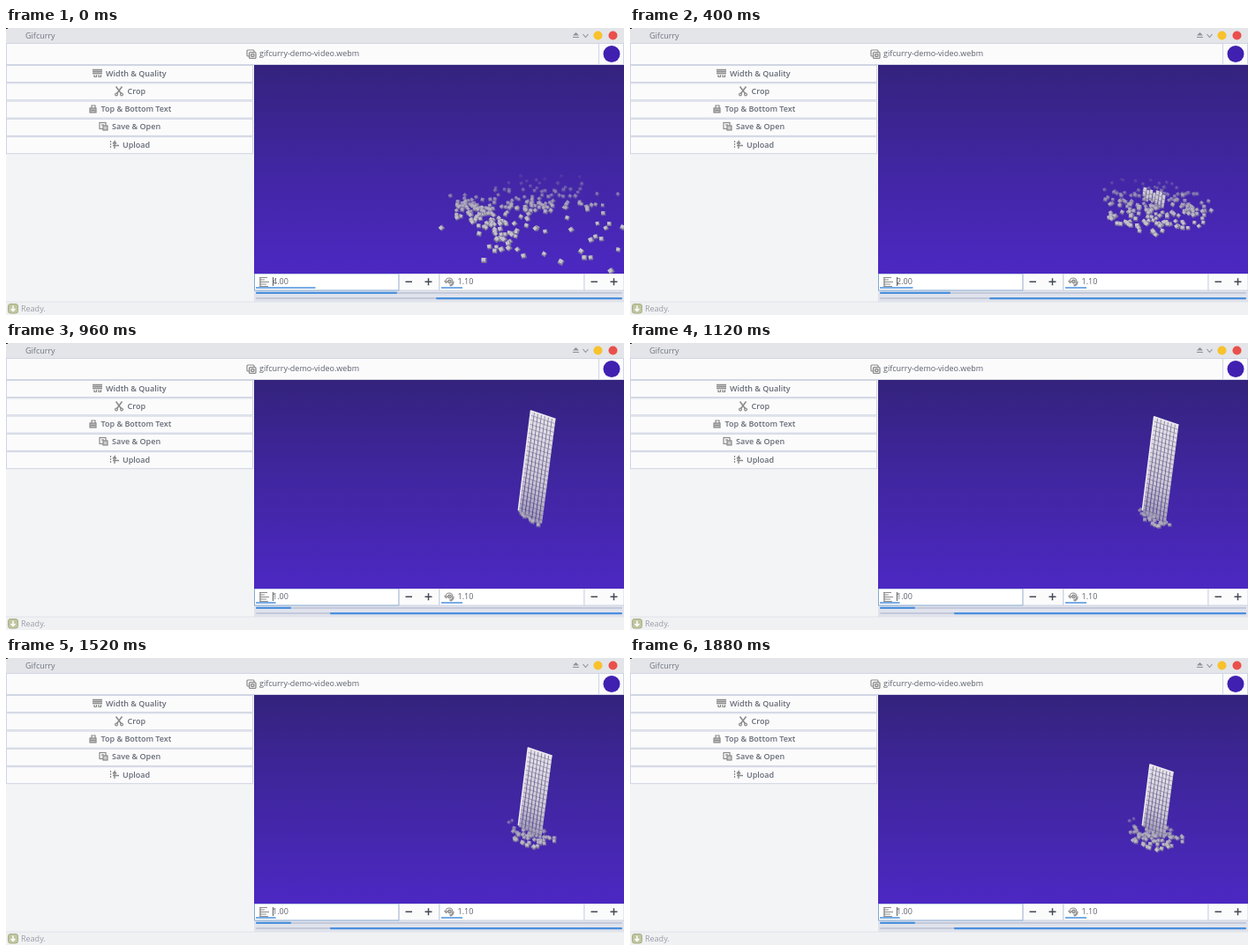
Recreate the animation shown at these times as an HTML page with a canvas. Size 700 by 326 pixels, loop 1.92 s.

```html
<!DOCTYPE html>
<html lang="en">
<head>
<meta charset="utf-8">
<title>Gifcurry</title>
<style>
html, body { margin: 0; width: 100%; height: 100%; overflow: hidden; background: #f3f4f6; }
#stage { position: relative; width: 700px; height: 326px; overflow: hidden; }
svg, canvas { position: absolute; left: 0; top: 0; }
canvas { left: 280.5px; top: 42px; }
text { font: 9px "Open Sans", "Noto Sans", sans-serif; fill: #5c616c; }
#menu text { font-weight: 600; fill: #656a75; }
.box { fill: #fbfbfc; stroke: #d0d5e3; }
.blue { fill: #4a90dd; }
.trough { fill: #c3c9da; }
.ico { fill: none; stroke: #8a8a8a; stroke-width: 1.2; }
.sign { stroke: #444a55; stroke-width: 1.5; }
</style>
</head>
<body>
<div id="stage">
<svg width="700" height="326" viewBox="0 0 700 326">
  <rect width="700" height="326" fill="#f3f4f6"/>
  <rect width="700" height="17" fill="#e3e5e9"/>
  <rect width="2" height="1" fill="#222"/>
  <text x="22" y="11.800" fill-opacity=".85">Gifcurry</text>
  <path d="M642 8.500L645.500 5L649 8.500ZM642 10h7v1h-7z" fill="#8b9099"/>
  <path d="M653.500 7l3 3.500l3-3.500" fill="none" stroke="#8b9099" stroke-width="1.100"/>
  <circle cx="670.500" cy="8.500" r="5" fill="#f8c22d"/>
  <circle cx="687.500" cy="8.500" r="5" fill="#ea504b"/>

  <rect class="box" x=".5" y="17.500" width="671" height="24"/>
  <rect class="box" x="671.500" y="17.500" width="28" height="24"/>
  <circle cx="686" cy="29.500" r="9.500" fill="#4020b0"/>
  <g class="ico">
    <rect x="273" y="25" width="8" height="7" rx="1"/>
    <rect x="275.500" y="27.500" width="7.500" height="7" rx="1" fill="#e4e4e4"/>
    <circle cx="279.300" cy="31" r="1.700"/>
  </g>
  <text x="287" y="32">gifcurry-demo-video.webm</text>

  <g id="menu"></g>
  <g class="ico">
    <path d="M98 47.500h11M98 49.500h11M98 51.500h11" stroke-width="1.500"/>
    <path d="M100 53v2.500h2.500V53M105 53v2.500h2.500V53"/>
    <path d="M124.500 66.500l6 8M131.500 66.500l-6 8" stroke-width="1.500"/>
    <circle cx="125" cy="75.500" r="1.400"/><circle cx="131" cy="75.500" r="1.400"/>
    <rect x="95" y="91" width="7" height="5" fill="#bbb"/><path d="M97 91v-3h4v3M96 93.500h5"/>
    <rect x="106" y="107.500" width="7" height="7"/><rect x="110" y="111" width="5" height="5" fill="#ccc"/><path d="M108 110h3"/>
    <path d="M118.500 128v9" stroke-dasharray="2 1"/><path d="M123 137v-8l-2 2.500M123 129l2 2.500M121 133.500h7" stroke-width="1.400"/>
  </g>

  <rect x="281" y="278" width="419" height="33" fill="#e0e3ec"/>
  <rect x="281.500" y="279" width="163.500" height="19" fill="#fff" stroke="#86a8cf"/>
  <rect class="box" x="445.500" y="279" width="45" height="19"/>
  <rect x="491" y="279" width="164" height="19" fill="#fff" stroke="#d0d5e3"/>
  <rect class="box" x="655" y="279" width="45" height="19"/>
  <path class="sign" d="M452.500 288.300h7.500M474.500 288.300h8M478.500 284.300v8M662.500 288.300h7.500M684.500 288.300h8M688.500 284.300v8"/>
  <path class="ico" d="M287 283.500h9M287 286h6M287 288.500h11M287 291h8M287 293.500h10M288 283v11"/>
  <g class="ico"><path d="M498 288a4 4 0 1 1 4 4M496.500 287l2 2.500l2-2.500"/><circle cx="502.500" cy="288" r="1.800" fill="#bbb"/><path d="M503 293a5 5 0 0 0 4-5"/></g>
  <path d="M302.500 283v10" stroke="#333" stroke-width=".8"/>
  <text id="value" x="302" y="291.200">4.00</text>
  <text x="511.500" y="291.200">1.10</text>
  <rect class="blue" id="under" x="283" y="294.300" height="1.500"/>
  <rect class="blue" x="493" y="294.300" width="24" height="1.500"/>
  <rect class="trough" x="283" y="300" width="415" height="2" rx="1"/>
  <rect class="trough" x="283" y="306" width="415" height="2" rx="1"/>
  <rect class="blue" id="start" x="283" y="299.800" height="2.200" rx="1"/>
  <rect class="blue" id="end" y="306" height="2.200" rx="1"/>

  <rect y="311" width="700" height="15" fill="#f0f1f3"/>
  <path d="M0 311h700" stroke="#dfe2e8"/>
  <rect x="2.500" y="313.500" width="11" height="10.500" rx="2.500" fill="#c0c6a0" stroke="#a8ae86"/>
  <path d="M8 315.500v6M5.500 319l2.500 2.500l2.500-2.500" fill="none" stroke="#fff" stroke-width="1.500"/>
  <text x="17" y="322" style="fill:#9a9da5">Ready.</text>
</svg>
<canvas id="video" width="420" height="237"></canvas>
</div>
<script>
const $ = id => document.getElementById(id);
const LOOP = 1920, STEP = 40;

// Sidebar buttons
[["Width & Quality", 113], ["Crop", 137.5], ["Top & Bottom Text", 107.5],
 ["Save & Open", 120], ["Upload", 132]].forEach(([label, x], i) => {
  const add = (tag, attrs) => {
    const el = document.createElementNS("http://www.w3.org/2000/svg", tag);
    for (const k in attrs) el.setAttribute(k, attrs[k]);
    return $("menu").appendChild(el);
  };
  const y = 42.5 + i * 20.3;
  add("rect", { class: "box", x: 0.5, y, width: 279, height: 19 });
  add("text", { x, y: y + 12 }).textContent = label;
});

const clamp = (v, a, b) => Math.min(b, Math.max(a, v));
const mix = (a, b, k) => a + (b - a) * k;

function track(points, t) {
  let i = 1;
  while (i < points.length - 1 && t > points[i][0]) i++;
  const [t0, a] = points[i - 1], [t1, b] = points[i];
  return mix(a, b, clamp((t - t0) / (t1 - t0), 0, 1));
}

function held(steps, t) {
  return steps.filter(s => s[0] <= t).pop();
}

let seed = 71;
function rand() {
  seed = (seed * 1664525 + 1013904223) >>> 0;
  return seed / 4294967296;
}
const bell = () => (rand() + rand() + rand() + rand() - 2) * 1.75;

// Start time shown in the entry, and the seek that follows it
const VALUES = [[0, 4], [120, 3], [400, 2], [720, 1]];
const SEEKS = [[0, 4], [320, 3], [600, 2], [920, 1]];

// Tower top, spread and number of loose cubes against video time
const TOP = [[1, 75.5], [1.04, 77], [1.32, 89], [1.56, 100], [1.96, 121], [2.04, 125], [3.08, 179], [3.3, 190]];
const SPREAD = [[1, 2], [1.04, 3], [1.32, 16], [1.56, 22], [2.04, 30], [3.08, 60], [3.3, 66]];
const COUNT = [[1, 14], [1.04, 16], [1.32, 40], [1.56, 56], [2.04, 95], [3.08, 190], [3.3, 200]];

const cube = () => ({ turn: rand() * 1.57, size: 4.4 + rand() * 1.2 });

// Golden-angle steps keep the pile even at every count
const pile = Array.from({ length: 200 }, (_, i) => {
  const a = i * 2.4, r = Math.pow(rand(), 0.65);
  return { ...cube(), u: rand(), dx: Math.cos(a) * r, dy: Math.sin(a) * r * 0.47 };
});

// x, y, spread x, spread y, cubes
const CLUSTERS = [[521, 198, 7, 8, 32], [540, 215, 12, 8, 62], [562, 239, 9, 8, 24], [592, 199, 15, 7, 48],
  [595, 212, 28, 14, 18], [655, 200, 22, 8, 20], [615, 180, 28, 7, 28], [665, 232, 14, 13, 10]];
const STRAYS = [[493, 227], [541, 264], [628, 266], [662, 261], [693, 252], [685, 276], [609, 257], [586, 259], [640, 229]];
const field = CLUSTERS.flatMap(([x, y, sx, sy, n]) =>
  Array.from({ length: n }, () => ({ ...cube(), x: x + bell() * sx, y: y + bell() * sy })))
  .concat(STRAYS.map(([x, y]) => ({ ...cube(), x, y })));

const COLS = 7;
const ragged = Array.from({ length: COLS }, () => rand() * 6 - 3);

const ctx = $("video").getContext("2d");
const sky = ctx.createLinearGradient(0, 42, 0, 278);
sky.addColorStop(0, "#34237d");
sky.addColorStop(0.5, "#4126a2");
sky.addColorStop(1, "#4c28c2");

function drawCube({ x, y, turn, size }) {
  const s = size * clamp(0.85 + (y - 190) / 300, 0.65, 1.1), h = s / 2;
  ctx.save();
  ctx.globalAlpha = clamp((y - 168) / 55, 0.08, 0.92);
  ctx.translate(x, y);
  ctx.rotate(turn - 0.78);
  ctx.fillStyle = "#7f7998";
  ctx.fillRect(-h, -h, s, s);
  ctx.fillStyle = "#cbc8d0";
  ctx.fillRect(-h, -h, s * 0.75, s * 0.7);
  ctx.restore();
}

function drawTower(top) {
  const lean = -0.125, left = 594 + lean * (top - 77), wide = 28 - (top - 77) * 0.03, drop = wide * 0.34;
  const pitch = wide / COLS, worn = clamp((top - 130) / 40, 0, 1);
  for (let c = 0; c < COLS; c++) {
    const k = c / COLS, x = left + wide * k, y = top + drop * k + Math.abs(ragged[c]) * worn * 1.5;
    const foot = Math.max(y + 2, 192 + 16 * k + ragged[c]);
    const len = foot - y, fx = x + lean * len;
    const shade = ctx.createLinearGradient(0, y, 0, foot);
    shade.addColorStop(0, worn ? "#cfccd6" : "#e6e3e9");
    shade.addColorStop(0.65, "#cdc9d6");
    shade.addColorStop(1, "#a29cba");
    ctx.fillStyle = shade;
    ctx.beginPath();
    ctx.moveTo(x, y);
    ctx.lineTo(x + pitch, y + drop / COLS);
    ctx.lineTo(fx + pitch * 0.85, foot + drop / COLS);
    ctx.lineTo(fx, foot);
    ctx.fill();
    ctx.strokeStyle = "rgba(80,72,112,.6)";
    ctx.lineWidth = 0.7;
    ctx.beginPath();
    if (c) {
      ctx.moveTo(x, y);
      ctx.lineTo(fx, foot);
    }
    for (let d = 5; d < len; d += 5) {
      ctx.moveTo(x + lean * d, y + d);
      ctx.lineTo(x + lean * d + pitch, y + d + drop / COLS);
    }
    ctx.stroke();
  }
  ctx.globalAlpha = 1 - worn;
  ctx.strokeStyle = "#edeaf0";
  ctx.lineWidth = 1.6;
  ctx.lineJoin = "round";
  ctx.beginPath();
  ctx.moveTo(left + lean * (190 - top), Math.max(top, 190));
  ctx.lineTo(left, top);
  ctx.lineTo(left + wide, top + drop);
  ctx.stroke();
  ctx.globalAlpha = 1;
}

function drawVideo(v) {
  ctx.setTransform(1, 0, 0, 1, -280.5, -42);
  ctx.fillStyle = sky;
  ctx.fillRect(280, 42, 421, 237);
  const byDepth = (a, b) => a.y - b.y;
  if (v >= 4) {
    const grow = 1 + (v - 4) * 0.3;
    field.map(p => ({ ...p, x: 590 + (p.x - 590) * grow, y: 200 + (p.y - 200) * grow }))
      .sort(byDepth).forEach(drawCube);
    return;
  }
  const spread = track(SPREAD, v), sink = spread * 0.07;
  const cubes = pile.slice(0, Math.round(track(COUNT, v))).map(p => ({
    ...p,
    x: mix(582, 605, p.u) + p.dx * spread,
    y: mix(192, 207, p.u) + p.dy * spread + sink
  })).sort(byDepth);
  const behind = p => p.y < 192 + (p.x - 581) * 0.6;
  cubes.filter(behind).forEach(drawCube);
  drawTower(track(TOP, v));
  cubes.filter(p => !behind(p)).forEach(drawCube);
}

function draw(t) {
  const value = held(VALUES, t)[1];
  $("value").textContent = value.toFixed(2);
  $("under").setAttribute("width", 7.5 + 15 * value);
  $("start").setAttribute("width", 40 * value);
  $("end").setAttribute("x", 327 + 40 * value);
  $("end").setAttribute("width", 371 - 40 * value);
  const [at, from] = held(SEEKS, t);
  drawVideo(from + (t - at) / 1000);
}

const began = performance.now();
function tick() {
  const t = (performance.now() - began) % LOOP;
  draw(Math.floor(t / STEP) * STEP);
  requestAnimationFrame(tick);
}
tick();
</script>
</body>
</html>
```
